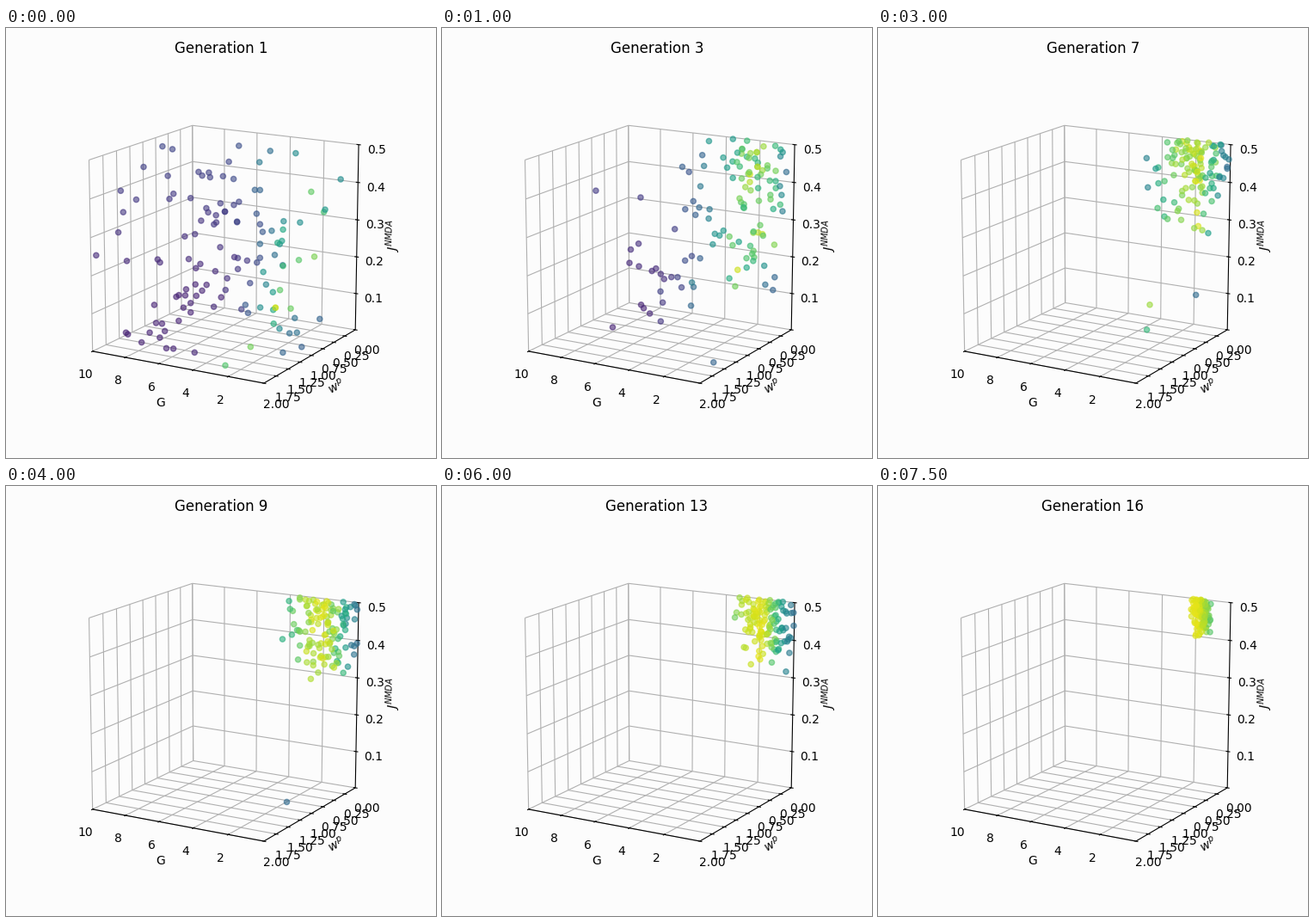
A matplotlib script for the animation above (8 s loop, 500 by 500 pixels).

```python
import numpy as np
import matplotlib.pyplot as plt
from matplotlib.animation import FuncAnimation
from matplotlib.collections import LineCollection

SIZE, DPI = 500, 100
GENERATIONS, STEP_MS = 16, 500
POPULATION = 125
AZIM, ELEV, DIST = np.radians(30), np.radians(15), 10
CENTER, SCALE = (256.1, 255.2), 226.5


def project(g, w, j):
    """Perspective view of (G, w, J) in stage pixels, y pointing down."""
    x, y, z = 0.5 - np.asarray(g) / 10, 0.5 - np.asarray(w) / 2, np.asarray(j) * 2 - 0.5
    right = x * np.cos(AZIM) + y * np.sin(AZIM)
    near = x * np.sin(AZIM) - y * np.cos(AZIM)
    up = z * np.cos(ELEV) - near * np.sin(ELEV)
    depth = near * np.cos(ELEV) + z * np.sin(ELEV)
    k = SCALE / (1 - depth / DIST)
    return np.stack([CENTER[0] + right * k, CENTER[1] - up * k], axis=-1)


def segment(a, b):
    return [project(*a), project(*b)]


def slant(a, b):
    """Angle of a projected edge, in degrees."""
    dx, dy = project(*b) - project(*a)
    return np.degrees(np.arctan2(-dy, dx))


def scouts(rng, n, age):
    """Individuals still exploring the box, which shrinks with age."""
    g = rng.uniform(0, 10 * np.exp(-age / 6), n)
    w = rng.uniform(0, 2 * np.exp(-age / 12), n)
    return project(g, w, rng.uniform(0, 0.5, n))


def cluster(rng, n, age):
    """Individuals gathered below the top edge; the last ages collapse quickly."""
    collapse = 0.22 + 0.78 / (1 + np.exp((age - 13) * 1.5))
    mid = 376 - 26 * np.exp(-age / 3)
    sx = (21 + 17 * np.exp(-age / 3)) * collapse
    sy = (40 + 75 * np.exp(-age / 3)) * np.sqrt(collapse)
    x = rng.normal(mid, sx, n * 20)
    top = 113 + 0.12 * (x - 217)
    y = top + np.abs(rng.normal(0, sy, n * 20))
    keep = (np.abs(x - mid) < 2.2 * sx) & (x < 409) & (y < top + 2.2 * sy) & (y < 345)
    return np.column_stack([x, y])[keep][:n]


def fitness(rng, pts, age):
    """Score peaks on a ridge that bends left near the floor."""
    x, y = pts.T
    drop = np.maximum(y - 262, 0)
    d = x - (370 - 0.8 * drop)
    d += rng.normal(0, 7, len(x)) * (1 - age / GENERATIONS)
    width = np.where(d < 0, 45 / (1 + drop / 100), 18)
    base = np.where(d < 0, 0.22 - 0.12 * np.clip((y - 120) / 180, 0, 1), 0.3)
    quality = 1 - rng.uniform(0, 0.65, len(x)) * np.exp(-age / 5)
    return base + (0.97 - base) * np.exp(-(d / width) ** 2 / 2) * quality


def population(age):
    rng = np.random.default_rng(age + 1)
    n_scouts = round(POPULATION * np.exp(-age / 2.2))
    pts = np.vstack([scouts(rng, n_scouts, age),
                     cluster(rng, POPULATION - n_scouts, age)])
    return pts, plt.cm.viridis(fitness(rng, pts, age), alpha=0.6)


clouds = [population(age) for age in range(GENERATIONS)]

fig = plt.figure(figsize=(SIZE / DPI, SIZE / DPI), dpi=DPI, facecolor="#fcfcfc")
ax = fig.add_axes([0, 0, 1, 1])
ax.set(xlim=(0, SIZE), ylim=(SIZE, 0))
ax.axis("off")


def label(x, y, text, size=10, **style):
    style = {"ha": "center", "va": "baseline", **style}
    return ax.text(x, y, text, fontsize=size, zorder=4, **style)


def tick_label(pos, offset, text):
    x, y = project(*pos) + offset
    label(x, y + 5, text)


grid = []
axes = [segment((10, 2, 0), (0, 2, 0)), segment((0, 2, 0), (0, 0, 0)),
        segment((0, 0, 0), (0, 0, 0.5))]
for g in range(10, 0, -2):
    grid += [segment((g, 2, 0), (g, 0, 0)), segment((g, 0, 0), (g, 0, 0.5))]
    axes.append(segment((g, 1.975, 0), (g, 2.025, 0)))
    tick_label((g, 2, 0), (-8.7, 26.3), f"{g}")
for w in np.arange(0, 2.01, 0.25):
    grid += [segment((0, w, 0), (10, w, 0)), segment((10, w, 0), (10, w, 0.5))]
    axes.append(segment((0.125, w, 0), (-0.125, w, 0)))
    tick_label((0, w, 0), (13 + w / 2, 23 + w / 2), f"{w:.2f}")
for j in np.arange(1, 6) / 10:
    grid += [segment((10, 2, j), (10, 0, j)), segment((10, 0, j), (0, 0, j))]
    axes.append(segment((0.125, 0, j), (-0.125, 0, j)))
    tick_label((0, 0, j), (20.6, 5), f"{j:.1f}")
ax.add_collection(LineCollection(grid, colors="#b0b0b0", linewidths=0.8, zorder=1))
ax.add_collection(LineCollection(axes, colors="black", linewidths=0.8, zorder=2))

label(180, 440, "G")
label(384, 417, "$w^p$", va="center", rotation=slant((0, 2, 0), (0, 0, 0)))
label(451, 242, "$J^{NMDA}$", va="center", rotation=slant((0, 0, 0), (0, 0, 0.5)))
title = label(250, 29, "", size=12)

dots = ax.scatter(*clouds[0][0].T, s=20, c=clouds[0][1], linewidths=1, zorder=3)


def draw(i):
    pts, colors = clouds[i]
    dots.set_offsets(pts)
    dots.set_facecolors(colors)
    dots.set_edgecolors(colors)
    title.set_text(f"Generation {i + 1}")
    return dots, title


anim = FuncAnimation(fig, draw, frames=GENERATIONS, interval=STEP_MS, repeat=True)
plt.show()
```
